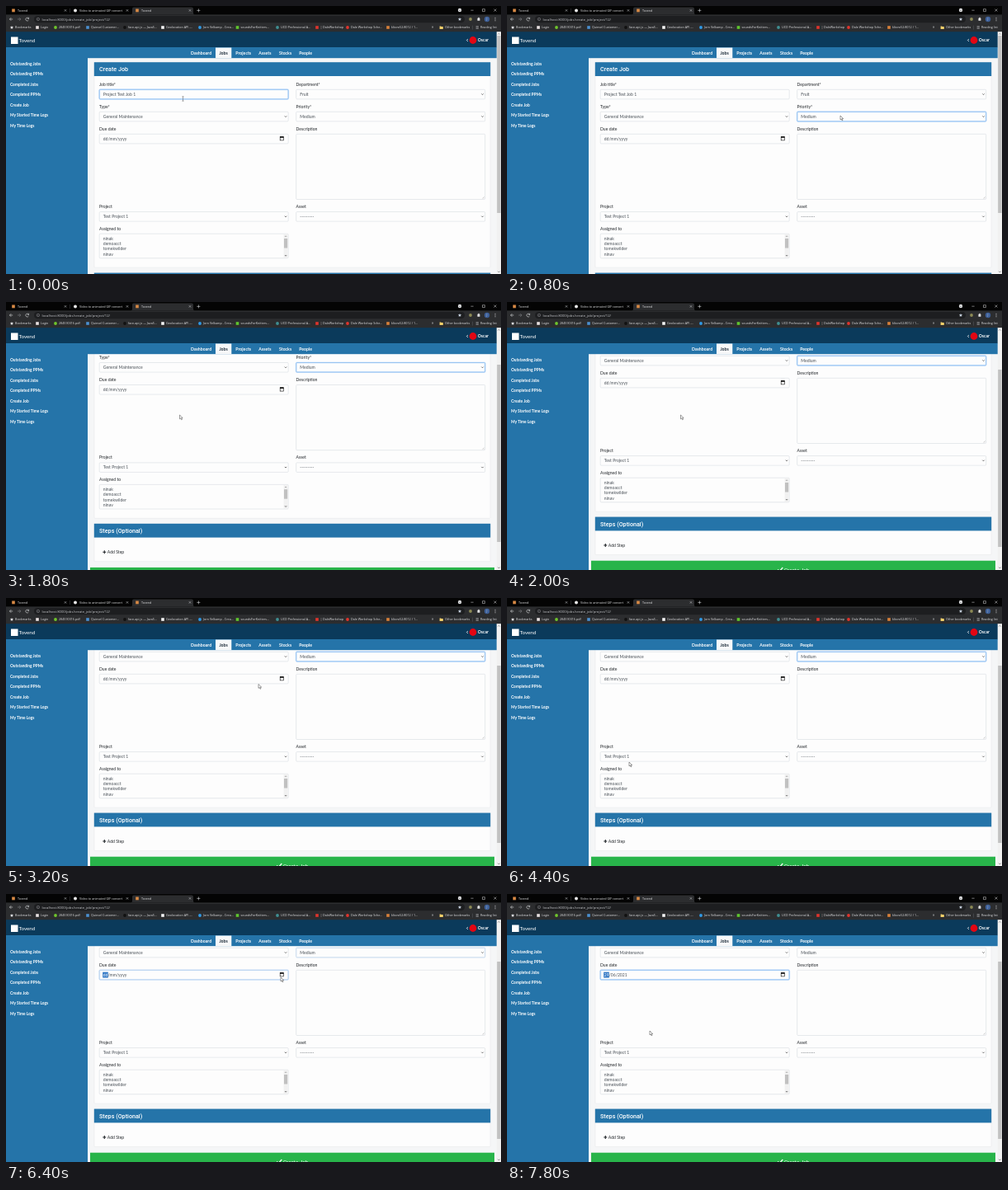
An HTML page that plays this animation: 600x325 px, repeating every 8000 ms.

```html
<!DOCTYPE html>
<html lang="en">
<head>
<meta charset="utf-8">
<title>Create Job</title>
<style>
  html, body { margin: 0; width: 100%; height: 100%; overflow: hidden; background: #f5f6f7; }
  svg { display: block; width: 100vw; height: 100vh; }
  text { font: 5.1px Lato, sans-serif; white-space: pre; }
  .ui { font-family: "Open Sans", sans-serif; }
  .heading { font-family: Roboto, sans-serif; }
</style>
</head>
<body>
<svg id="stage" viewBox="0 0 600 325" preserveAspectRatio="none">
  <defs><clipPath id="page"><rect x="99" y="63" width="495.6" height="262"/></clipPath></defs>
</svg>
<script>
const LOOP = 8000, STEP = 200;
const BLUE = '#2574a9', NAVY = '#0b3a5b', INK = '#212529', VALUE = '#495057', CARD = '#fdfdfd';
const stage = document.getElementById('stage');

function add(tag, attrs, parent = stage) {
  const node = document.createElementNS('http://www.w3.org/2000/svg', tag);
  for (const key in attrs) node.setAttribute(key, attrs[key]);
  parent.appendChild(node);
  return node;
}
const rect = (x, y, width, height, fill, parent, extra) =>
  add('rect', { x, y, width, height, fill, ...extra }, parent);
const dot = (cx, cy, r, fill, parent) => add('circle', { cx, cy, r, fill }, parent);
const line = (d, stroke, width = .7, parent) =>
  add('path', { d, stroke, 'stroke-width': width, fill: 'none' }, parent);

// Text is placed by its left edge and the middle of its capitals.
function label(text, x, middle, fill = INK, parent = stage, size = 5.1, weight = 400, family = '') {
  const node = add('text', { x, y: middle + size * .36, fill, class: family }, parent);
  node.style.fontSize = size + 'px';
  node.style.fontWeight = weight;
  node.textContent = text;
  return node;
}
const ui = (text, x, y, size = 3.7, fill = '#e0e1e3') => label(text, x, y, fill, stage, size, 400, 'ui');

/* Scrolling page */
rect(99, 63, 496, 262, '#f5f6f7');
const view = add('g', { 'clip-path': 'url(#page)' });
const page = add('g', {}, view);

function card(y, height, title) {
  rect(107, y, 480, height, CARD, page, { stroke: '#dfe1e3', 'stroke-width': .4, rx: 1 });
  rect(106.8, y, 480.4, 16.8, BLUE, page);
  label(title, 113, y + 8.4, '#fff', page, 7.2, 500, 'heading');
}
function field(x, y, height = 12) {
  const box = { x: x + .2, y: y + .2, width: 229, height: height - .4, rx: 1.1 };
  add('rect', { ...box, fill: CARD, stroke: '#ced4da', 'stroke-width': .5 }, page);
  const focus = add('g', { opacity: 0 }, page);
  add('rect', { ...box, fill: 'none', stroke: '#0078ff', 'stroke-opacity': .14, 'stroke-width': 2 }, focus);
  add('rect', { ...box, fill: 'none', stroke: '#74b5f4', 'stroke-width': .55 }, focus);
  return focus;
}
function input(name, value, x, y) {
  label(name, x, y, INK, page);
  const focus = field(x, y + 6.1);
  label(value, x + 4.8, y + 12.1, VALUE, page);
  return focus;
}
function select(name, value, x, y) {
  const focus = input(name, value, x, y);
  line(`M${x + 224.8} ${y + 11.4}l1.2 1.2 1.2-1.2`, '#333', .7, page);
  return focus;
}

const LEFT = 113, RIGHT = 351.5;
card(68.2, 249, 'Create Job');
const titleFocus = input('Job title*', 'Project Test Job 1', LEFT, 95);
select('Department*', 'Fruit', RIGHT, 95);
select('Type*', 'General Maintenance', LEFT, 122);
const priorityFocus = select('Priority*', 'Medium', RIGHT, 122);

const dateFocus = input('Due date', '', LEFT, 149);
const daySelection = rect(117.2, 157.7, 6.6, 6.8, '#2b74c4', page, { opacity: 0 });
const dateText = label('', 117.8, 161, VALUE, page, 5);
const [day, rest] = [0, 1].map(() => add('tspan', {}, dateText));
rect(332.2, 158.7, 4.2, 4.2, 'none', page, { stroke: '#111', 'stroke-width': .6 });
rect(332, 158.2, 4.6, 1.6, '#111', page);

label('Description', RIGHT, 149, INK, page);
field(RIGHT, 155.1, 79.6);
line('M577.6 233.4l2-2M579 233.5l.7-.7', '#888', .4, page);
select('Project', 'Test Project 1', LEFT, 243.3);
select('Asset', '---------', RIGHT, 243.3);

label('Assigned to', LEFT, 270.2, INK, page);
field(LEFT, 276, 30);
['ninak', 'demoacct', 'tomekwilder', 'ninav'].forEach((name, i) =>
  label(name, 117.8, 282.2 + i * 6.2, VALUE, page));
rect(336.6, 276.6, 5, 28.8, '#f1f1f1', page);
rect(337, 282, 4.2, 11.5, '#c1c1c1', page);
line('M338 279.9l1.1-1.1 1.1 1.1', '#888', .7, page);
line('M338 302.1l1.1 1.1 1.1-1.1', '#333', .7, page);

card(323.6, 45.9, 'Steps (Optional)');
line('M117.3 358h4M119.3 356v4', INK, 1.1, page);
label('Add Step', 122.8, 358, INK, page);
rect(102, 376.7, 490, 22, '#28b44a', page);
line('M328.3 387.4l2 2 4-4.4', '#fff', 1.2, page);
label('Create Job', 336, 387.3, '#fff', page, 6.25, 400, 'heading');

/* Page scroll bar */
rect(594.7, 31, 5.3, 294, '#f1f1f1');
line('M596.2 34.6l1.2-1.3 1.2 1.3', '#777');
line('M596.2 321.6l1.2 1.3 1.2-1.3', '#555');
const thumb = rect(595.2, 36, 4.4, 215, '#c1c1c1');

/* Site header, navigation and side menu */
rect(0, 31, 594.7, 19.2, NAVY);
rect(0, 50, 594.7, 13.2, BLUE);
rect(0, 63, 99, 262, BLUE);
rect(6, 37.5, 8.5, 8.5, '#fff');
label('Tovend', 15.5, 41.6, '#fff', stage, 6.25);
line('M559.9 40l-1.5 1.5 1.5 1.5', '#fff', .8);
dot(566, 41.5, 4.4, '#e30613');
label('Oscar', 571.8, 41.6, '#fff', stage, 5, 700);

rect(254, 50.5, 19.3, 12.7, '#f7f8f9');
[['Dashboard', 224], ['Jobs', 258.4], ['Projects', 278.3], ['Assets', 306.3], ['Stocks', 331], ['People', 355.2]]
  .forEach(([text, x]) => label(text, x, 57.2, text === 'Jobs' ? '#1b2a38' : '#fff', stage, 5.2, 700));
['Outstanding Jobs', 'Outstanding PPMs', 'Completed Jobs', 'Completed PPMs', 'Create Job', 'My Started Time Logs', 'My Time Logs']
  .forEach((text, i) => label(text, 5, 70.2 + i * 12.45, '#fff', stage, 4.8, 700));

/* Browser frame */
const FRAME = '#040404', TOOLBAR = '#2c2d2f';
rect(0, 0, 600, 31.2, TOOLBAR);
rect(0, 0, 600, 10.4, FRAME);
add('path', { d: 'M151 10.4q2 0 2-2v-5q0-2 2-2h70q2 0 2 2v5q0 2 2 2z', fill: TOOLBAR });
[[9, 'Tovend', 72], [84, 'Video to animated GIF convert', 147], [159, 'Tovend', 223]].forEach(([x, text, close], i) => {
  if (i === 1) dot(x, 5.4, 2, '#e8e8e8');
  else rect(x - 1.8, 3.5, 3.6, 3.8, '#d98a45');
  ui(text, x + 5, 5.4);
  line(`M${close - 1.2} 4.2l2.4 2.4m0-2.4l-2.4 2.4`, '#d5d7da', .5);
});
line('M77.5 3v5', '#55575b', .4);
line('M231.4 5.4h4M233.4 3.4v4', '#d5d7da', .6);
dot(550, 5, 2.2, '#e4e5e7');
line('M549 4.6l1 1 1-1', '#222', .6);
line('M563.4 5.2h3.2M577.5 3.7h2.9v2.9h-2.9zM591.4 3.6l3 3m0-3l-3 3', '#e4e5e7', .5);

line('M8.2 16H4.4m1.8-1.8L4.4 16l1.8 1.8', '#e0e1e3', .6);
line('M14 16h3.8M16 14.2l1.8 1.8-1.8 1.8', '#85878b', .6);
line('M27.4 15.2a1.9 1.9 0 1 0 0 1.8M27.6 13.8v1.6h-1.6', '#e0e1e3', .6);
rect(34, 11.9, 522, 8.3, '#1d1e20', stage, { rx: 4.1 });
line('M37.2 16a1.7 1.7 0 1 0 3.4 0a1.7 1.7 0 1 0-3.4 0M38.9 15.6v1.3', '#b5b7ba', .4);
ui('localhost:8000/jobs/create_job/project/12/', 43.5, 16, 4.2, '#c5c7ca');

const star = (x, y, fill) =>
  add('path', { d: `M${x} ${y - 2.1}l.6 1.4 1.5.1-1.1 1 .3 1.5-1.3-.8-1.3.8.3-1.5-1.1-1 1.5-.1z`, fill });
star(550, 16, '#c9d3e0');
dot(563, 16, 1.9, '#8c8a55');
rect(571.4, 14.8, 3, 3, '#dfe0e2');
dot(573, 14.6, .8, '#dfe0e2');
dot(583, 16, 3.2, '#3d5f98');
ui('J', 582.4, 16, 3.4, '#fff');
[14.3, 16, 17.7].forEach(y => dot(593, y, .5, '#dfe0e2'));

star(7, 26, '#e4e5e7');
[
  [11, '', 'Bookmarks'], [42, '#e9e2e2', 'Login'], [64, '#6fc52c', '284590316.pdf'],
  [103, '#4a90d0', 'Quinsel Customer...'], [148, '#111', 'face-api.js — JavaS...'],
  [194, '#f3f3f3', 'Geolocation API -...'], [239, '#2f9be8', 'Jorn Velkamp - Crea...'],
  [284.5, '#5fc52e', 'soundsForKnitters...'], [333, '#3f8f92', 'UCD Professional A...'],
  [381, '#e0342c', '| DaleWorkshop'], [418, '#e0342c', 'Dale Workshop Sche...'],
  [467, '#d9803a', 'kltoro52:8012 / 1...']
].forEach(([x, color, text], i) => {
  if (color && i % 2) rect(x - 5.8, 24.2, 3.6, 3.6, color);
  else if (color) dot(x - 4, 26, 1.9, color);
  ui(text, x, 26);
});
ui('»', 516, 25.6, 4.5);
add('path', { d: 'M525.6 24.4h1.5l.5.6h2.2v3h-4.2z', fill: '#f0cf6a' });
ui('Other bookmarks', 532, 26);
line('M565.5 23.6v5', '#66686c', .4);
line('M569.6 24.7h3.2M569.6 26h3.2M569.6 27.3h3.2', '#d5d7da', .5);
ui('Reading list', 575, 26);

/* Pointer */
const pointer = add('g', {});
const arrow = add('path', {
  d: 'M0 0v4.9l1.2-1 .9 1.9.9-.4-.9-1.8h1.6z', fill: '#fff', stroke: '#2a2a2a', 'stroke-width': .45
}, pointer);
const beam = line('M-1.1-2.7h2.2M0-2.7v5.4M-1.1 2.7h2.2', '#444', .45, pointer);

// Each row: time, then the values held from that time on.
const tracks = {
  pointer: [
    [0, 214.5, 112.5], [400, 300, 116], [600, 392, 129], [800, 404, 133], [1000, 330, 135],
    [1200, 228, 137], [1400, 210.5, 137],
    [2600, 225, 112], [2800, 258, 82], [3000, 292, 80], [3200, 306, 104.5], [3400, 250, 140],
    [3600, 162, 182], [3800, 148, 199],
    [5000, 150, 215], [5200, 165, 250], [5400, 235, 265], [5600, 330, 230], [5800, 368, 160],
    [6000, 345, 112], [6200, 333, 101], [6600, 318, 115], [6800, 258, 150], [7000, 205, 177],
    [7200, 183, 166], [7400, 173, 166]
  ],
  scroll: [[0, 0], [1800, 54.8], [2000, 63]],
  title: [[0, 1], [800, 0]],
  priority: [[0, 0], [800, 1], [6400, .3], [6600, 0]],
  date: [[0, 0], [6400, .6], [6600, 1]]
};
const valueAt = (name, t) => tracks[name].findLast(row => row[0] <= t).slice(1);

function draw(t) {
  const [scroll] = valueAt('scroll', t);
  page.setAttribute('transform', `translate(0 ${-scroll})`);
  thumb.setAttribute('y', 36 + scroll * .73);

  titleFocus.setAttribute('opacity', valueAt('title', t));
  priorityFocus.setAttribute('opacity', valueAt('priority', t));
  dateFocus.setAttribute('opacity', valueAt('date', t));

  const selected = t >= 6400, picked = t >= 7800;
  daySelection.setAttribute('opacity', selected ? 1 : 0);
  day.setAttribute('fill', selected ? '#fff' : VALUE);
  day.textContent = picked ? '29' : 'dd';
  rest.textContent = picked ? '/06/2021' : '/mm/yyyy';

  pointer.setAttribute('transform', `translate(${valueAt('pointer', t)})`);
  const overTitle = t < 400;
  arrow.setAttribute('opacity', overTitle ? 0 : 1);
  beam.setAttribute('opacity', overTitle ? 1 : 0);
}

const start = performance.now();
function tick(now) {
  const t = Math.max(0, now - start) % LOOP;
  draw(Math.floor(t / STEP) * STEP);
  requestAnimationFrame(tick);
}
draw(0);
requestAnimationFrame(tick);
</script>
</body>
</html>
```
